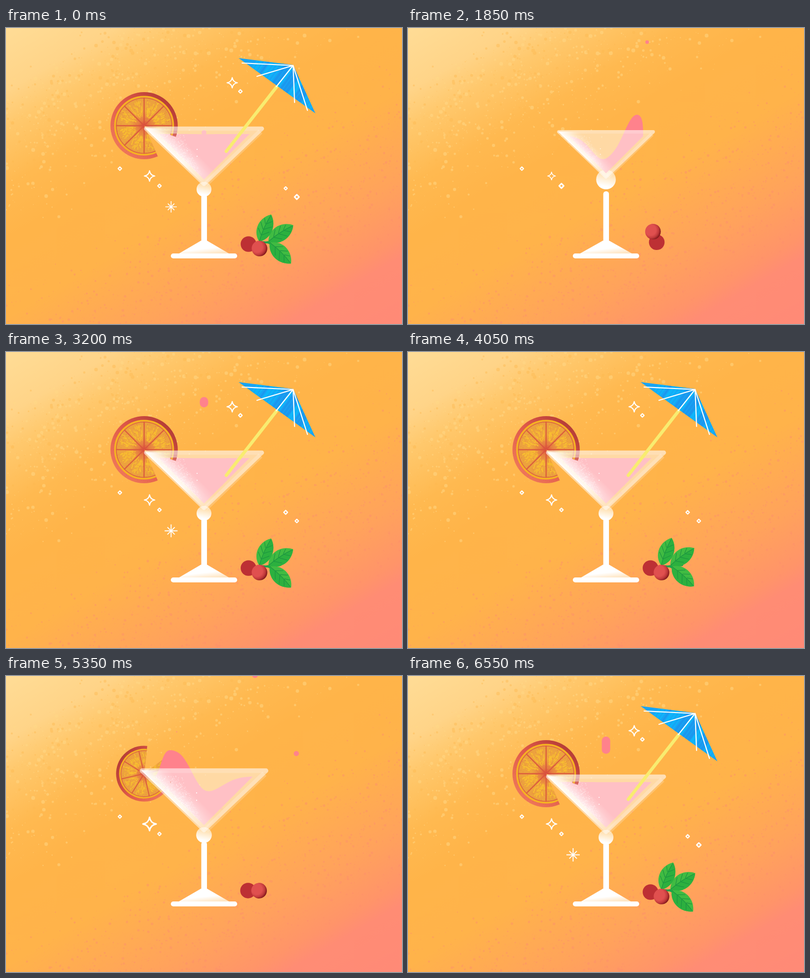
An HTML page that plays this animation: 800 by 600 pixels, repeating every 6600 ms.

```html
<!DOCTYPE html>
<html lang="en">
<head>
<meta charset="utf-8">
<title>Cocktail</title>
<style>
html,body{margin:0;width:100%;height:100%;overflow:hidden;background:#ffb449}
svg{display:block;width:100vw;height:100vh}
</style>
</head>
<body>
<svg viewBox="0 0 800 600" preserveAspectRatio="none">
<defs>
  <linearGradient id="sky" gradientUnits="userSpaceOnUse" x1="0" y1="0" x2="461" y2="798">
    <stop offset="0" stop-color="#ffdc96"/><stop offset=".12" stop-color="#ffd488"/>
    <stop offset=".19" stop-color="#ffc86c"/><stop offset=".3" stop-color="#ffb950"/>
    <stop offset=".4" stop-color="#ffb449"/><stop offset=".55" stop-color="#ffb34a"/>
    <stop offset=".72" stop-color="#ffa35b"/><stop offset=".83" stop-color="#ff9469"/>
    <stop offset=".87" stop-color="#ff8c74"/><stop offset="1" stop-color="#ff8a77"/>
  </linearGradient>
  <linearGradient id="wall" gradientUnits="userSpaceOnUse" x1="340" y1="260" x2="366" y2="234">
    <stop offset="0" stop-color="#fff" stop-opacity=".95"/>
    <stop offset=".35" stop-color="#fff" stop-opacity=".6"/>
    <stop offset=".7" stop-color="#fff" stop-opacity=".2"/>
    <stop offset="1" stop-color="#fff" stop-opacity="0"/>
  </linearGradient>
  <linearGradient id="fade" gradientUnits="userSpaceOnUse" x1="0" y1="200" x2="0" y2="320">
    <stop offset="0" stop-color="#fff"/><stop offset=".6" stop-color="#fff"/><stop offset="1" stop-color="#333"/>
  </linearGradient>
  <mask id="wallMask"><path d="M270 190H530V330H270Z" fill="url(#fade)"/></mask>
  <linearGradient id="knob" x1=".6" y1="0" x2=".4" y2="1">
    <stop offset=".1" stop-color="#ffdca6"/><stop offset=".85" stop-color="#fff"/>
  </linearGradient>
  <linearGradient id="foot" x1=".5" y1=".4" x2=".75" y2="1">
    <stop offset=".3" stop-color="#fff"/><stop offset="1" stop-color="#ffe3bd"/>
  </linearGradient>
  <radialGradient id="berry" cx=".35" cy=".4" r=".68">
    <stop offset=".5" stop-color="#e0504f"/><stop offset=".75" stop-color="#c23a3b"/>
    <stop offset="1" stop-color="#7c1418"/>
  </radialGradient>
  <linearGradient id="rind" x1=".1" y1=".9" x2=".85" y2=".15">
    <stop offset="0" stop-color="#f07a5c"/><stop offset=".55" stop-color="#e0594a"/>
    <stop offset="1" stop-color="#b63d38"/>
  </linearGradient>
  <radialGradient id="flesh">
    <stop offset="0" stop-color="#dd4a3c"/><stop offset=".2" stop-color="#e67e41"/>
    <stop offset=".5" stop-color="#efa63c"/><stop offset="1" stop-color="#eba03e"/>
  </radialGradient>
  <clipPath id="canopyClip"><path d="M470 61L580 75L625 173Z"/></clipPath>
  <clipPath id="tipClip"><path d="M332 214H352V250H332Z"/></clipPath>
  <clipPath id="sliceClip"><path id="sliceShape"/></clipPath>
  <g id="leaf">
    <path d="M0 0C14-21 44-21 60 0C44 20 14 20 0 0Z" fill="#40bb42"/>
    <path d="M0 0C14 20 44 20 60 0Q30-4 0 0Z" fill="#2cb03f"/>
    <path d="M0 0Q30-4 57 0M14-2L25-13M26-3L38-13M38-3L48-9M14-1L26 11M26-2L38 12M38-2L48 8"
      fill="none" stroke="#1c9540" stroke-width="1.2"/>
  </g>
</defs>
<rect width="800" height="600" fill="url(#sky)"/>
<g id="grain"></g>

<g id="orange">
  <g clip-path="url(#sliceClip)">
    <circle r="68" fill="url(#rind)"/>
    <circle r="59" fill="url(#flesh)"/>
    <g id="pulp"></g>
    <circle r="59" fill="none" stroke="#f7b41f" stroke-width="3"/>
    <circle r="56" fill="none" stroke="#dd6440" stroke-width="1.5"/>
  </g>
</g>

<g id="drops" fill="#ff828c"></g>
<g fill="#fff">
  <path id="footCone" d="M394 431H406L452 458H348Z" fill="url(#foot)"/>
  <rect id="footBar" x="333" y="457" width="134" height="10" rx="5"/>
  <rect id="stem" x="394.5" width="11.5" rx="5.5"/>
</g>
<circle id="ball" cx="400" fill="url(#knob)"/>
<path id="liquid" fill="#ff828c"/>
<rect id="fall" fill="#ff828c"/>
<g id="bowl">
  <path d="M283 204H517L400 316Z" fill="#fff" stroke="#fff" stroke-width="8.500" stroke-linejoin="round" opacity=".5"/>
  <path d="M283 204H517" stroke="#fff" stroke-width="8.500" stroke-linecap="round" opacity=".18"/>
  <path d="M514 210L404 316" stroke="#fff" stroke-width="11" opacity=".2"/>
  <g mask="url(#wallMask)">
    <path d="M281 203H517L400 318Z" fill="url(#wall)"/>
    <g id="bowlGrain"></g>
  </g>
  <path d="M386 246h.1M386 260h.1" stroke="#fff" stroke-width="2" stroke-linecap="round"/>
</g>
<use href="#orange" clip-path="url(#tipClip)" opacity=".8"/>

<path id="stick" stroke="#f8ec70" stroke-width="6.500" stroke-linecap="round"/>
<g id="canopy">
  <path d="M470 61L580 75L625 173Z" fill="#18a4f4"/>
  <g id="stripes" clip-path="url(#canopyClip)"></g>
  <path d="M477 71L580 76L507 98M546 119L580 76L583 151M580 76L609 167" fill="none" stroke="#fff"
    stroke-width="2.200" stroke-linecap="round" stroke-linejoin="round"/>
</g>

<path id="twig" d="M516 434Q535 436 554 432M528 434L545 443" stroke="#1fa34a" stroke-width="4"
  stroke-linecap="round" fill="none"/>
<use id="leaf2" href="#leaf"/><use id="leaf3" href="#leaf"/><use id="leaf1" href="#leaf"/>
<circle id="berryA" fill="#bd3034"/>
<circle id="berryB" fill="url(#berry)"/>
<g id="sparkles" fill="none" stroke="#fff" stroke-width="2.200" stroke-linejoin="round"></g>
</svg>
<script>
const $ = id => document.getElementById(id);
const LOOP = 3300, REBUILD = 1380, TAU = Math.PI * 2;

function set(target, attrs) {
  const el = typeof target === 'string' ? $(target) : target;
  for (const k in attrs) el.setAttribute(k, attrs[k]);
  return el;
}
const add = (parent, tag, attrs = {}) =>
  set($(parent).appendChild(document.createElementNS('http://www.w3.org/2000/svg', tag)), attrs);

let seed = 17;
const rnd = (a = 1, b = 0) => {
  seed = (seed * 16807) % 2147483647;
  return b + (a - b) * seed / 2147483647;
};
const dot = (x, y, r) =>
  `M${(x - r).toFixed(1)} ${y.toFixed(1)}a${r} ${r} 0 1 0 ${2 * r} 0a${r} ${r} 0 1 0 ${-2 * r} 0`;
const polar = (deg, r) => `${r * Math.cos(deg * TAU / 360)} ${r * Math.sin(deg * TAU / 360)}`;

// Motion: a smooth ramp, a damped spring that first reaches 1 after one beat, and a shrink.
function ramp(t, from, to) {
  const u = Math.min(1, Math.max(0, (t - from) / (to - from)));
  return u * u * (3 - 2 * u);
}
function spring(t, birth, beat, damp) {
  const u = Math.max(0, (t - birth) / beat);
  return 1 - Math.exp(-damp * u) * Math.cos(u * Math.PI / 2);
}
const leave = (t, death) => 1 - ramp(t, death, death + 190);
const scaleAt = (x, y, sx, sy = sx) => `translate(${x} ${y}) scale(${sx} ${sy}) translate(${-x} ${-y})`;

// Speckles lie in bands parallel to the background gradient.
function speckle(count, from, to, peak, rMax, fill, opacity) {
  let d = '';
  for (let i = 0; i < count; i++) {
    const x = rnd(800), y = rnd(600), s = .5 * x + .866 * y;
    const chance = s < peak ? (s - from) / (peak - from) : (to - s) / (to - peak);
    if (rnd() < chance) d += dot(x, y, +(.6 + rMax * rnd() ** 3).toFixed(1));
  }
  add('grain', 'path', { d, fill, opacity });
}
speckle(4200, 90, 390, 190, 3.4, '#ffda88', .5);
speckle(3000, 70, 330, 150, 3.2, '#fdb850', .42);
speckle(6500, 440, 800, 650, 2.1, '#fd8e6c', .42);

function buildOrange() {
  let ribs = '', streaks = '', specks = '';
  for (let a = 0; a < 360; a += 45) ribs += `M0 0L${polar(a, 57)}`;
  for (let i = 0; i < 260; i++) {
    const a = Math.floor(rnd(8)) * 45 + rnd(38, 7), r = rnd(48, 17);
    streaks += `M${polar(a, r)}L${polar(a + rnd(2, -2), r + rnd(9, 3))}`;
  }
  for (let i = 0; i < 420; i++) {
    const [x, y] = polar(rnd(360), 66 * Math.sqrt(rnd())).split(' ').map(Number);
    specks += dot(x, y, .6);
  }
  set('sliceShape', { d: `M0 0L${polar(66, 69)}A69 69 0 1 1 ${polar(19.5, 69)}Z` });
  add('pulp', 'path', { d: streaks, stroke: '#fbc62e', 'stroke-width': 1.8, opacity: .75 });
  add('pulp', 'path', { d: specks, fill: '#d9583c', opacity: .5 });
  add('pulp', 'path', { d: ribs, stroke: '#d9533f', 'stroke-width': 2.4, opacity: .85 });
}
buildOrange();

let wallDots = '';
for (let i = 0; i < 420; i++) {
  const y = rnd(300, 214);
  wallDots += dot(292 + (y - 204) * 1.04 + (308 - y) * .6 * rnd() ** 2, y, .6);
}
add('bowlGrain', 'path', { d: wallDots, fill: '#fff', opacity: .7 });

for (let x = 470; x < 650; x += 8)
  add('stripes', 'path', {
    d: `M${x + 50} 50L${x - 40} 175`, 'stroke-width': rnd(6, 2),
    stroke: rnd() < .6 ? '#08c2fd' : '#1f90ea', opacity: .6
  });

// One hump of liquid swings from wall to wall, with a hollow in the middle when it is at the side.
function drawLiquid(c, apexY, half) {
  const energy = ramp(c, 1650, 1800) * Math.exp(-Math.max(0, c - 2550) / 130);
  const swing = .8 * Math.cos(TAU * (c - 1850) / 550), side = Math.abs(swing);
  const hit = Math.max(0, c - LOOP);
  const ripple = 9 * Math.exp(-hit / 170) * Math.sin(hit / 55);
  let d = `M400 ${apexY}`;
  for (let i = -24; i <= 24; i++) {
    const s = i / 24, edge = 1 - s ** 10;
    const hump = energy * edge * Math.exp(-(Math.abs((s - swing) / .38) ** (2 + 2 * side)));
    const hollow = energy * edge * side * Math.exp(-(((s + swing * .1) / .45) ** 2));
    const y = apexY - half - hump * (78 - 38 * side) + hollow * 58 + ripple * Math.exp(-((s / .2) ** 2));
    d += `L${400 + half * (s + .15 * swing * hump)} ${y}`;
  }
  set('liquid', { d: d + 'Z' });
}

// Each drop is thrown in an arc, given by its highest point.
const drops = [
  { x: 360, y: 48.6, peak: 2430, vx: .04, size: 4.3 },
  { x: 385, y: 93.5, peak: 2435, vx: .14, size: 4.3 },
  { x: 604, y: 126.5, peak: 2312, vx: .067, size: 8.3 },
  { x: 510, y: -4, peak: 2120, vx: .1, size: 6 }
].map(o => ({ ...o, el: add('drops', 'circle') }));

const STAR = 'M0-10.500Q1.500-1.500 10.500 0Q1.500 1.500 0 10.500Q-1.500 1.500-10.500 0Q-1.500-1.500 0-10.500Z';
const DIAMOND = 'M0-3.500L3.500 0L0 3.500L-3.500 0Z';
const BURST = 'M0-10.500V10.500M-10.500 0H10.500M-6-6L6 6M6-6L-6 6';
const sparkles = [
  [230, 285, DIAMOND, 1385], [310, 320, DIAMOND, 1590], [290, 300, STAR, 1740], [457, 111, STAR, 2170],
  [473.5, 128.5, DIAMOND, 2290], [565, 325, DIAMOND, 2800], [587.5, 342.5, DIAMOND, 3050]
].map(([x, y, d, birth]) => ({ x, y, birth, el: add('sparkles', 'path', { d }) }));
const burst = add('sparkles', 'path', { d: BURST, 'stroke-width': 1.5 });

function drawGlass(c) {
  const up = 1 - ramp(c, 1850, 2150);
  const bowl = spring(c, 1718, 200, 1.5) * leave(c, 4380);
  set('bowl', { transform: `translate(0 ${-15 * up}) ${scaleAt(400, 320, bowl)}` });
  drawLiquid(c, 320 - 13 * bowl - 15 * up, 92 * bowl);

  const r = 15 * Math.max(0, spring(c, 1518, 190, .6)) * leave(c, 4440);
  set('ball', { cy: 342 - 15 * up - r, r });
  const foot = ramp(c, 1390, 1540) * leave(c, 4490);
  const height = (105 + 6 * up) * ramp(c, 1400, 1580) * leave(c, 4480);
  set('stem', { y: 442 - height, height });
  set('footBar', { transform: scaleAt(400, 462, foot) });
  set('footCone', { transform: scaleAt(400, 458, foot * (1 + .04 * up), foot) });
}

function drawUmbrella(c) {
  const stretch = spring(c, 2085, 90, 1) * leave(c, 4280);
  const dx = 135 * (stretch - 1), dy = -175 * (stretch - 1);
  const size = ramp(c, 2120, 2330) * leave(c, 4280);
  set('stick', { d: `M445 250L${445 + 102 * stretch} ${250 - 131 * stretch}`, opacity: size > 0 ? 1 : 0 });
  set('canopy', { transform: `translate(${dx} ${dy}) ${scaleAt(580, 75, size)}` });
}

function drawBerries(c) {
  const sway = 1.5 * Math.cos(TAU * c / 1650);
  const leaf = (id, x, y, angle, birth) => set(id, {
    transform: `translate(${x} ${y}) rotate(${angle + sway}) scale(${spring(c, birth, 130, .9) * leave(c, 4300)})`
  });
  leaf('leaf1', 511.5, 433, -68 + 15 * Math.exp(-(c - 2370) / 200), 2325);
  leaf('leaf2', 530, 433, -35, 2540);
  leaf('leaf3', 533, 435, 43, 2460);
  set('twig', { transform: scaleAt(514, 436, ramp(c, 2290, 2400) * leave(c, 4350)) });

  const turn = (382 - .55 * Math.max(0, 2090 - c)) * TAU / 360;
  const gap = 12 + 10.6 * Math.exp(-(c - 1600) / 180) * Math.cos((c - 1600) / 140);
  const rise = Math.max(0, 2180 - c) / 580;
  const r = 15.8 * ramp(c, 1400, 1540) * leave(c, 4430);
  [['berryA', -gap], ['berryB', gap]].forEach(([id, g]) => set(id, {
    cx: 501 - 4 * rise + g * Math.cos(turn), cy: 442.5 - 33.5 * rise + g * Math.sin(turn), r
  }));
}

function drawDrops(c) {
  for (const o of drops) {
    const age = c - o.peak;
    set(o.el, {
      cx: o.x + o.vx * age, cy: o.y + .00045 * age * age,
      r: o.size * Math.max(0, 1 - (age / 430) ** 2)
    });
  }
  // The last drop gathers, stretches as it falls and sinks into the glass.
  const land = ramp(c, 3255, 3300);
  const width = c > 3340 ? 0 : 17 * ramp(c, 3080, 3180) * (1 - .42 * land);
  const height = width && width + 18 * ramp(c, 3180, 3250) * (1 - land);
  const y = Math.min(212, 98 + 41 * (Math.max(0, c - 3180) / 70) ** 2);
  set('fall', { x: 400 - width / 2, y: y - height / 2, width, height, rx: width / 2 });
}

function drawSparkles(c) {
  for (const { x, y, birth, el } of sparkles)
    set(el, { transform: `translate(${x} ${y}) scale(${spring(c, birth, 150, .6) * leave(c, 4320)})` });
  const u = Math.min(1, Math.max(0, (c - 2350) / 1080));
  set(burst, { transform: `translate(333.5 362.5) scale(${1.4 * Math.sqrt(u) * Math.min(1, 7 * (1 - u))})` });
}

function draw(now) {
  // Count from the moment the drink is rebuilt, so that every part has one birth and one end.
  const t = now % LOOP, c = t < REBUILD ? t + LOOP : t;
  drawGlass(c);
  drawUmbrella(c);
  drawBerries(c);
  drawDrops(c);
  drawSparkles(c);
  const slice = ramp(c, 1940, 2090) * leave(c, 4340);
  const roll = 170 * (spring(c, 1988, 187, 1.05) - 1);
  set('orange', { transform: `translate(279 198) rotate(${roll}) scale(${slice})` });
}

const start = performance.now();
function tick() {
  draw(performance.now() - start);
  requestAnimationFrame(tick);
}
draw(0);
requestAnimationFrame(tick);
</script>
</body>
</html>
```
